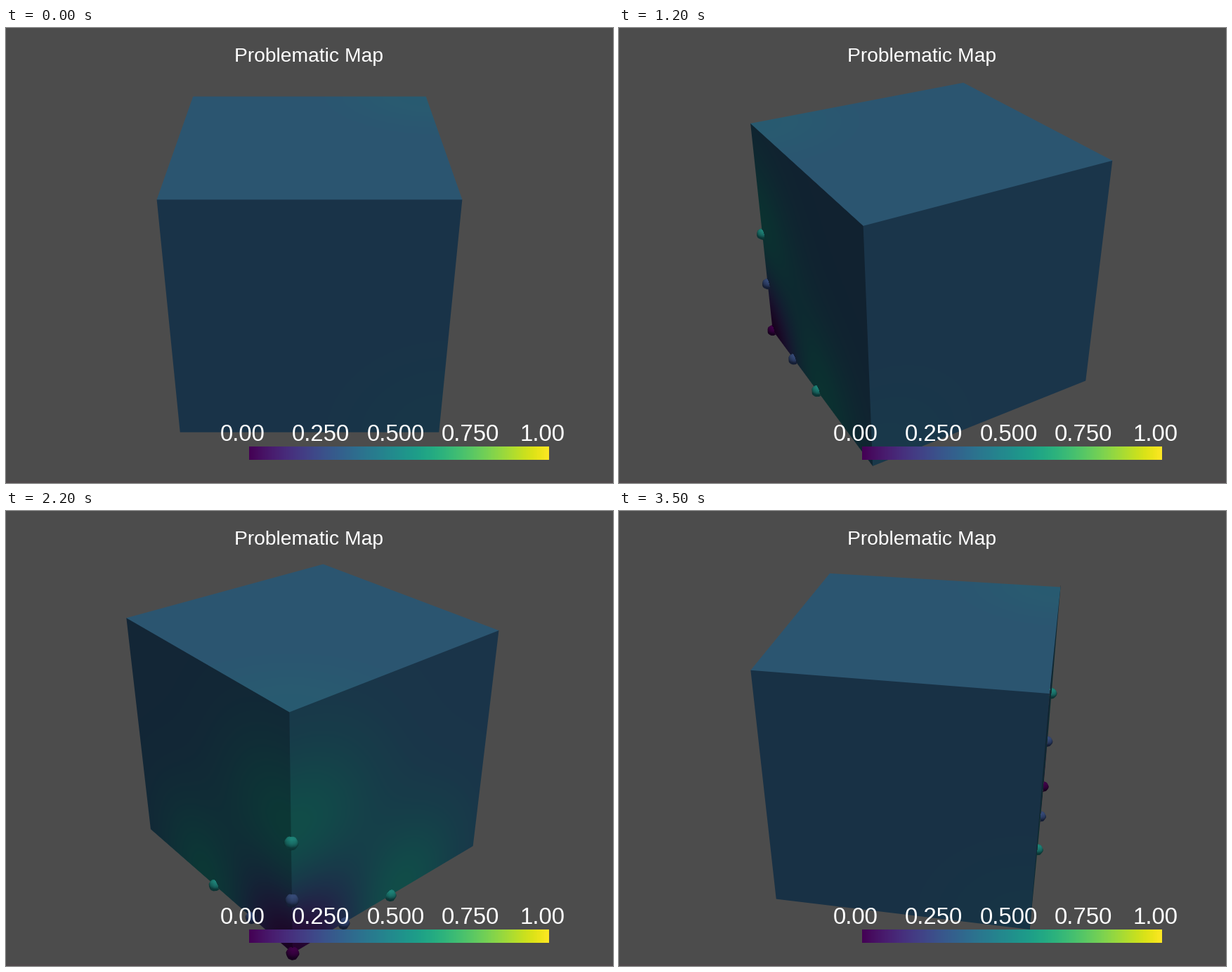
Recreate the animation shown at these times as a matplotlib script. Size 864x648 px, loop 3600 ms.

```python
import numpy as np
import matplotlib as mpl
import matplotlib.pyplot as plt
from matplotlib.animation import FuncAnimation

W, H, DPI = 864, 648, 100
FRAMES, INTERVAL = 36, 100
FOCAL = H / 2 / np.tan(np.radians(15))
RADIUS, HEIGHT = 6.0, 2 * np.sqrt(3)
DOT_R = 0.05
BG = np.full(3, 76.0)
VIRIDIS = mpl.colormaps["viridis"](np.arange(256))[:, :3] * 255


def light(elev, azim, power, color=(1, 1, 1)):
    e, a = np.radians([elev, azim])
    direction = np.cos(e) * np.sin(a), np.sin(e), np.cos(e) * np.cos(a)
    return direction, power * np.array(color)


# key, fill, head and two back lights, fixed to the camera
LIGHTS = [
    light(50, 10, 0.75, (1, 0.9723, 0.9021)),
    light(-75, 0, 0.25, (0.92, 0.95, 1)),
    light(0, 0, 0.25),
    light(0, 110, 0.75 / 3.5),
    light(0, -110, 0.75 / 3.5),
]
LIGHT_DIR = np.array([d for d, _ in LIGHTS])
LIGHT_COL = np.array([c for _, c in LIGHTS])

# samples along the three edges that leave one bottom corner
CORNER = np.array([1.0, -1.0, -1.0])
AXES = np.diag([-1.0, 1.0, 1.0])
DOTS = np.array([CORNER] + [CORNER + k * a for a in AXES for k in (0.5, 1.0)])
VALUES = np.array([0] + [0.25, 0.5] * 3)

# coarse ball: eight meridians, six rings and the poles
LON, LAT = np.meshgrid(np.arange(8) * np.pi / 4, np.arange(8) * np.pi / 7)
BALL = DOT_R * np.stack([np.sin(LAT) * np.cos(LON), np.sin(LAT) * np.sin(LON),
                         np.cos(LAT)], axis=-1).reshape(-1, 3)


def kernel(p):
    d2 = ((p[:, None, :] - DOTS[None]) ** 2).sum(-1)
    return np.exp(-2 * d2)


MEAN = VALUES.mean()
WEIGHTS = np.linalg.solve(kernel(DOTS), VALUES - MEAN)


def colormap(v):
    return VIRIDIS[np.clip((v * 256).astype(int), 0, 255)]


def field(p):
    return MEAN + kernel(p) @ WEIGHTS


def shade(normal):
    return np.clip(normal @ LIGHT_DIR.T, 0, None) @ LIGHT_COL


def camera(t):
    """Position and the rows right, up, toward in the cube's frame."""
    s, c = np.sin(t), np.cos(t)
    pos = np.array([-RADIUS * s, RADIUS * c, HEIGHT])
    dist = np.linalg.norm(pos)
    se, ce = HEIGHT / dist, RADIUS / dist
    basis = np.array([[c, s, 0], [se * s, -se * c, ce], pos / dist])
    return pos, basis


def project(p, pos, basis):
    q = (p - pos) @ basis.T
    depth = -q[..., 2]
    return (W / 2 + FOCAL * q[..., 0] / depth,
            H / 2 - FOCAL * q[..., 1] / depth, depth)


def window(px, py):
    """Slices of the stage around some points, with the pixel centres."""
    x0, y0 = max(int(px.min()) - 2, 0), max(int(py.min()) - 2, 0)
    x1, y1 = min(int(px.max()) + 3, W), min(int(py.max()) + 3, H)
    xs, ys = np.meshgrid(np.arange(x0, x1) + 0.5, np.arange(y0, y1) + 0.5)
    return (slice(y0, y1), slice(x0, x1)), xs, ys


def hull(px, py):
    """Convex outline of a point cloud."""
    pts = sorted(set(zip(np.round(px, 4), np.round(py, 4))))

    def chain(points):
        out = []
        for x, y in points:
            while len(out) > 1:
                (ax_, ay), (bx, by) = out[-2:]
                if (bx - ax_) * (y - ay) - (by - ay) * (x - ax_) > 1e-6:
                    break
                out.pop()
            out.append((x, y))
        return out[:-1]

    return np.array(chain(pts) + chain(pts[::-1])).T


def coverage(xs, ys, px, py):
    """Soft-edged inside test for a convex polygon."""
    cov = np.ones_like(xs)
    cx, cy = px.mean(), py.mean()
    for i in range(len(px)):
        ax_, ay, bx, by = px[i - 1], py[i - 1], px[i], py[i]
        nx, ny = ay - by, bx - ax_
        n = np.hypot(nx, ny) * np.sign((cx - ax_) * nx + (cy - ay) * ny)
        cov *= np.clip(((xs - ax_) * nx + (ys - ay) * ny) / n + 0.5, 0, 1)
    return cov


def draw_face(img, zbuf, axis, sign, pos, basis):
    corners = np.insert([[-1, -1], [1, -1], [1, 1], [-1, 1]], axis, sign, axis=1)
    px, py, _ = project(corners, pos, basis)
    win, xs, ys = window(px, py)
    cov = coverage(xs, ys, px, py)
    on = cov > 0
    ray = np.stack([(xs[on] - W / 2) / FOCAL, (H / 2 - ys[on]) / FOCAL,
                    -np.ones(on.sum())], axis=1) @ basis
    depth = (sign - pos[axis]) / ray[:, axis]
    p = np.clip(pos + depth[:, None] * ray, -1, 1)
    color = colormap(field(p)) * shade(sign * basis[:, axis])
    img[win][on] += cov[on][:, None] * (color - BG)
    near = cov >= 0.5
    zbuf[win][near] = depth[near[on]]


def draw_dot(img, zbuf, point, value, pos, basis):
    cx, cy, depth = project(point, pos, basis)
    px, py = hull(*project(point + BALL, pos, basis)[:2])
    win, xs, ys = window(px, py)
    r = FOCAL * DOT_R / depth
    nx, ny = (xs - cx) / r, (cy - ys) / r
    nz = np.sqrt(np.clip(1 - nx ** 2 - ny ** 2, 0, 1))
    normal = np.stack([nx, ny, nz], axis=-1)
    normal /= np.linalg.norm(normal, axis=-1, keepdims=True)
    visible = depth - DOT_R * nz < zbuf[win]
    cov = (coverage(xs, ys, px, py) * visible)[..., None]
    color = colormap(np.array(value)) * shade(normal)
    img[win] += cov * (color - img[win])


def render(i):
    pos, basis = camera(np.radians(i * 360 / FRAMES))
    img = np.tile(BG, (H, W, 1))
    zbuf = np.full((H, W), np.inf)
    for axis in range(3):
        for sign in (-1, 1):
            if sign * pos[axis] > 1:
                draw_face(img, zbuf, axis, sign, pos, basis)
    depths = project(DOTS, pos, basis)[2]
    for k in np.argsort(-depths):
        draw_dot(img, zbuf, DOTS[k], VALUES[k], pos, basis)
    img[-3:] = 79, 74, 76
    return np.clip(img + 0.5, 0, 255).astype(np.uint8)


fig = plt.figure(figsize=(W / DPI, H / DPI), dpi=DPI)
ax = fig.add_axes([0, 0, 1, 1])
ax.axis("off")
scene = ax.imshow(render(0), extent=(0, W, H, 0), interpolation="nearest",
                  aspect="auto")
ax.imshow(VIRIDIS[None] / 255, extent=(346, 773, 615, 596),
          interpolation="nearest", aspect="auto", zorder=2)
ax.set(xlim=(0, W), ylim=(H, 0))


def label(x, y, text, px):
    ax.text(x, y, text, size=px * 72 / DPI, color="white", ha="center",
            va="baseline", family="Liberation Sans", zorder=3)


label(431, 48, "Problematic Map", 28.2)
for x, text in zip((336.5, 448, 554.5, 661, 764),
                   ("0.00", "0.250", "0.500", "0.750", "1.00")):
    label(x, 588, text, 33)


def update(i):
    scene.set_data(render(i))
    return [scene]


anim = FuncAnimation(fig, update, frames=FRAMES, interval=INTERVAL, repeat=True,
                     repeat_delay=0, blit=False)
plt.show()
```
